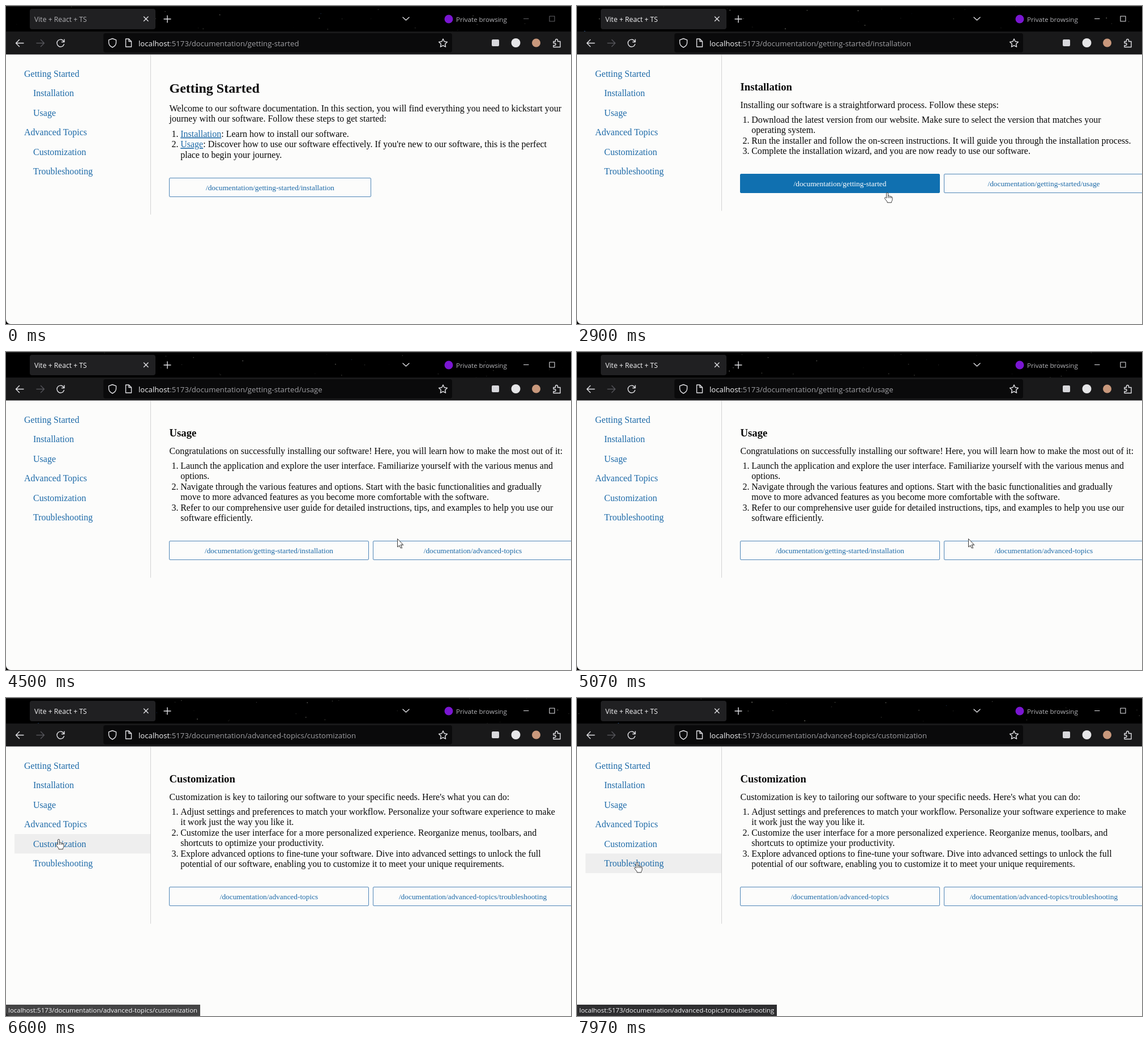
An HTML page for the animation above (8 s loop, 998 by 561 pixels).

```html
<!DOCTYPE html>
<html lang="en">
<head>
<meta charset="utf-8">
<title>Documentation navigation</title>
<style>
  html, body { margin: 0; width: 100%; height: 100%; overflow: hidden; background: #000; }
  svg { position: absolute; left: 0; top: 0; display: block; }
  text { white-space: pre; }
  .ui { font-family: "Open Sans", "Noto Sans", sans-serif; }
  .doc { font: 16.03px "Liberation Serif", "Times New Roman", serif; fill: #080808; }
  .link { fill: #1d6aa8; }
  .under { text-decoration: underline; }
  .button { font-size: 13.36px; text-anchor: middle; }
  .icon { fill: none; stroke: #e2e2e6; stroke-width: 1.4; stroke-linecap: round; stroke-linejoin: round; }
  #status {
    position: absolute; left: 0; top: 541px; height: 20px; padding: 0 5px 0 4px;
    font-size: 11.47px; line-height: 20px; white-space: pre;
    color: #f6f6f8;
  }
</style>
</head>
<body>
<svg width="998" height="561" viewBox="0 0 998 561">
  <rect width="998" height="561" fill="#000"/>
  <g id="stars"></g>
  <path d="M0 .5H998" stroke="#2c2c2c"/>
  <rect x="42" y="5" width="222" height="36" rx="4" fill="#202022"/>
  <rect y="45" width="998" height="41" fill="#19191a"/>
  <rect x="172" y="48" width="616" height="34" rx="4" fill="#0a0a0b"/>

  <g class="ui">
    <text id="tab" x="50" y="28" font-size="12.2">Vite + React + TS</text>
    <text x="795" y="27.5" font-size="11.6" fill="#b4b4b8">Private browsing</text>
    <text x="234" y="71.3" font-size="13.2" fill="#a0a0a4"><tspan fill="#f4f4f6">localhost</tspan>:5173<tspan id="path"></tspan></text>
  </g>

  <g class="icon">
    <path d="M243.5 19l7.5 7.5M251 19l-7.5 7.5M279 23h12M285 17v12M701 20l5.5 5L712 20"/>
    <path d="M31 65.5H17.5M23.5 59.5l-6 6 6 6"/>
    <path d="M54 65.5h13.5M61.5 59.5l6 6-6 6" stroke="#55555a"/>
    <path d="M102.3 63A6.4 6.4 0 1 0 102.5 67.5M103 59v4.5h-4.5"/>
    <path d="M188 57.5l6.5 2.4v4.6c0 4-2.8 6.7-6.5 8.5c-3.7-1.8-6.5-4.5-6.5-8.5v-4.6z"/>
    <path d="M211.5 58h5.5l4.5 4.5v9.5h-10zM217 58v4.5h4.5"/>
    <path d="M772 58l2.2 4.7 5.2.7-3.8 3.6 1 5.1-4.6-2.5-4.6 2.5 1-5.1-3.8-3.6 5.2-.7z"/>
    <path d="M967 62.5h3.5v-2a2 2 0 0 1 4 0v2h4.5v10h-12v-3h2a2 2 0 0 0 0-4h-2z"/>
    <g id="controls" stroke-width="1.1"><path d="M914.5 22.5h8.5"/><rect x="960" y="18" width="9" height="9"/></g>
  </g>
  <circle cx="782" cy="23" r="7.5" fill="#7a16d2"/>
  <rect x="858" y="59" width="13" height="12" rx="2" fill="#d8d8dc"/>
  <circle cx="900.5" cy="65" r="8" fill="#e6e6e8"/>
  <circle cx="936.5" cy="65" r="7.5" fill="#c9987c"/>

  <path d="M0 85.5H998V561H8A8 8 0 0 1 0 553Z" fill="#fcfcfb"/>
  <g id="page" class="doc"></g>
  <g id="pointer" stroke="#3a3a3a" stroke-linejoin="round">
    <g id="arrow">
      <path d="M2 2v14.5l3.4-3 2.3 5 2.3-1-2.2-4.8h4.6z" fill="#000" stroke="none" opacity=".2"/>
      <path d="M.5.5v14.5l3.3-3 2.3 5 2.2-1-2.2-4.9h4.4z" fill="#fff"/>
    </g>
    <g id="hand">
      <path d="M-1.5 10V1.8q0-1.5 1.5-1.5t1.5 1.5V6q2.3-.7 2.8.7 2-.5 2.5.8 2.2-.2 2.2 1.8v3q0 2-1.5 4v1.5H0v-1.5l-4.3-5.5q-.9-1.7.6-2.1 1.2 0 2.2 1.3z" fill="#fff"/>
      <path d="M1.5 6v4M4.3 7v3M6.8 7.5v2.5" fill="none"/>
    </g>
  </g>
</svg>
<div id="status" class="ui"></div>

<script>
const LOOP = 8000;
const $ = id => document.getElementById(id);
const ROOT = "/documentation";
const START = ROOT + "/getting-started", ADVANCED = ROOT + "/advanced-topics";
const INSTALL = START + "/installation", USAGE = START + "/usage";
const CUSTOM = ADVANCED + "/customization", TROUBLE = ADVANCED + "/troubleshooting";

const menu = [
  ["Getting Started", START], ["Installation", INSTALL], ["Usage", USAGE],
  ["Advanced Topics", ADVANCED], ["Customization", CUSTOM], ["Troubleshooting", TROUBLE]
];

const pages = [
  { from: 0, path: START, title: "Getting Started", section: true,
    intro: ["Welcome to our software documentation. In this section, you will find everything you need to kickstart your",
            "journey with our software. Follow these steps to get started:"],
    steps: [["Installation: Learn how to install our software."],
            ["Usage: Discover how to use our software effectively. If you're new to our software, this is the perfect",
             "place to begin your journey."]],
    buttons: [INSTALL] },
  { from: 2600, path: INSTALL, title: "Installation",
    intro: ["Installing our software is a straightforward process. Follow these steps:"],
    steps: [["Download the latest version from our website. Make sure to select the version that matches your", "operating system."],
            ["Run the installer and follow the on-screen instructions. It will guide you through the installation process."],
            ["Complete the installation wizard, and you are now ready to use our software."]],
    buttons: [START, USAGE] },
  { from: 4500, path: USAGE, title: "Usage",
    intro: ["Congratulations on successfully installing our software! Here, you will learn how to make the most out of it:"],
    steps: [["Launch the application and explore the user interface. Familiarize yourself with the various menus and", "options."],
            ["Navigate through the various features and options. Start with the basic functionalities and gradually",
             "move to more advanced features as you become more comfortable with the software."],
            ["Refer to our comprehensive user guide for detailed instructions, tips, and examples to help you use our",
             "software efficiently."]],
    buttons: [INSTALL, ADVANCED] },
  { from: 5500, path: ADVANCED, title: "Advanced Topics", section: true,
    intro: ["Welcome to the advanced topics section. Here, you will find more in-depth information about our",
            "software. Explore these topics to learn more:"],
    steps: [["Customization: Learn how to tailor our software to your needs."],
            ["Troubleshooting: Find solutions to common issues and get the most out of our software on your", "journey."]],
    buttons: [USAGE, CUSTOM] },
  { from: 6450, path: CUSTOM, title: "Customization",
    intro: ["Customization is key to tailoring our software to your specific needs. Here's what you can do:"],
    steps: [["Adjust settings and preferences to match your workflow. Personalize your software experience to make", "it work just the way you like it."],
            ["Customize the user interface for a more personalized experience. Reorganize menus, toolbars, and",
             "shortcuts to optimize your productivity."],
            ["Explore advanced options to fine-tune your software. Dive into advanced settings to unlock the full",
             "potential of our software, enabling you to customize it to meet your unique requirements."]],
    buttons: [ADVANCED, TROUBLE] }
];

// Pointer path: time, x, y
const track = [
  [1150, 872, 566], [1470, 783, 413], [1690, 733, 361], [2300, 548, 329], [3450, 548, 329],
  [3830, 597, 329], [4250, 691, 329], [5100, 691, 329], [5300, 695, 345], [5550, 695, 345],
  [6350, 93, 249], [7150, 93, 249], [7600, 106, 290], [LOOP, 106, 290]
];

const LINE = 18.4, ROW = 34.4, MENU_TOP = 102.4, STATUS_FADE = 170;
const text = (x, y, body, attrs = "") => `<text x="${x}" y="${y}" ${attrs}>${body}</text>`;

for (const page of pages) {
  const lines = page.intro.length + page.steps.flat().length;
  page.first = page.section ? 186 : 179.5;
  page.buttonTop = page.first + (lines - 1) * LINE + 43.3;
  const width = page.buttons.length > 1 ? 352 : 356;
  page.boxes = page.buttons.map((path, i) => ({ path, x: 288.5 + i * 360, width }));
}

function drawPage(page, hover) {
  const bottom = page.buttonTop + 65;
  let out = `<path d="M255.5 86V${bottom}" stroke="#d2d2d2"/>`;
  menu.forEach(([label, path], i) => {
    const y = MENU_TOP + i * ROW;
    if (hover === "menu" + i) out += `<rect x="15" y="${y}" width="240" height="${ROW}" fill="#eee"/>`;
    out += text(i % 3 ? 48 : 32, y + 22.6, label, 'class="link"');
  });

  out += text(288.5, page.section ? 153 : 148.5, page.title,
    `font-weight="bold" font-size="${page.section ? 24 : 18.72}"`);
  let y = page.first;
  for (const line of page.intro) { out += text(288.5, y, line); y += LINE; }
  y += 8;
  page.steps.forEach((step, i) => {
    out += text(292.5, y, `${i + 1}.`);
    for (const line of step) {
      const body = page.section ? line.replace(/^(\w+):/, '<tspan class="link under">$1</tspan>:') : line;
      out += text(308.2, y, body);
      y += LINE;
    }
  });

  page.boxes.forEach((box, i) => {
    const on = hover === "button" + i;
    out += `<rect x="${box.x}" y="${Math.round(page.buttonTop) + .5}" width="${box.width}" height="33" rx="1.5"
      fill="${on ? "#1070b0" : "#fcfcfb"}" stroke="${on ? "#1070b0" : "#4f86b8"}"/>`;
    out += text(box.x + box.width / 2, page.buttonTop + 21.7, box.path,
      `class="button ${on ? "" : "link"}" fill="#fff"`);
  });
  $("page").innerHTML = out;
  $("path").textContent = page.path;
}

function pointerAt(t) {
  if (t < track[0][0]) return null;
  const i = track.findIndex(key => key[0] > t);
  const [t0, x0, y0] = track[i - 1], [t1, x1, y1] = track[i];
  const k = (t - t0) / (t1 - t0);
  return { x: x0 + (x1 - x0) * k, y: y0 + (y1 - y0) * k };
}

function hoverAt(page, p) {
  if (!p) return "";
  const row = Math.floor((p.y - MENU_TOP) / ROW);
  if (p.x > 15 && p.x < 255 && menu[row]) return "menu" + row;
  if (p.y < page.buttonTop || p.y > page.buttonTop + 33) return "";
  const i = page.boxes.findIndex(b => p.x > b.x && p.x < b.x + b.width);
  return i < 0 ? "" : "button" + i;
}

let seed = 11;
const random = () => (seed = seed * 16807 % 2147483647) / 2147483647;
random();
const stars = Array.from({ length: 48 }, () => {
  const node = document.createElementNS("http://www.w3.org/2000/svg", "circle");
  node.setAttribute("r", .5 + random() * .5);
  node.setAttribute("fill", random() < .1 ? "#4a78b8" : "#8c8c84");
  $("stars").append(node);
  return { node, x: random() * 998, y: random() * 45, speed: 4 + random() * 10, phase: random() * 6.28 };
});

let shown = "";
function frame(now) {
  const t = now % LOOP;
  const page = pages.findLast(p => p.from <= t);
  const pointer = pointerAt(t);
  const hover = hoverAt(page, pointer);
  const active = t >= 450;

  if (shown !== page.path + hover) {
    shown = page.path + hover;
    drawPage(page, hover);
    const overMenu = hover.startsWith("menu");
    $("status").hidden = !overMenu;
    if (overMenu) $("status").textContent = "localhost:5173" + menu[hover.slice(4)][1];
  }
  // The status bar fades in again after each page load
  $("status").style.background = `rgb(46 46 48 / ${Math.min(1, (t - page.from) / STATUS_FADE)})`;
  $("tab").setAttribute("fill", active ? "#f4f4f6" : "#b0b0b4");
  $("controls").setAttribute("stroke", active ? "#e2e2e6" : "#626266");

  $("pointer").style.display = pointer ? "" : "none";
  if (pointer) $("pointer").setAttribute("transform", `translate(${Math.round(pointer.x)} ${Math.round(pointer.y)})`);
  $("arrow").style.display = hover ? "none" : "";
  $("hand").style.display = hover ? "" : "none";

  for (const s of stars) {
    s.node.setAttribute("cx", (s.x + s.speed * t / 1000) % 998);
    s.node.setAttribute("cy", s.y);
    s.node.setAttribute("opacity", Math.max(0, .25 + .5 * Math.sin(s.phase + t / 700)));
  }
  requestAnimationFrame(frame);
}
requestAnimationFrame(frame);
</script>
</body>
</html>
```
